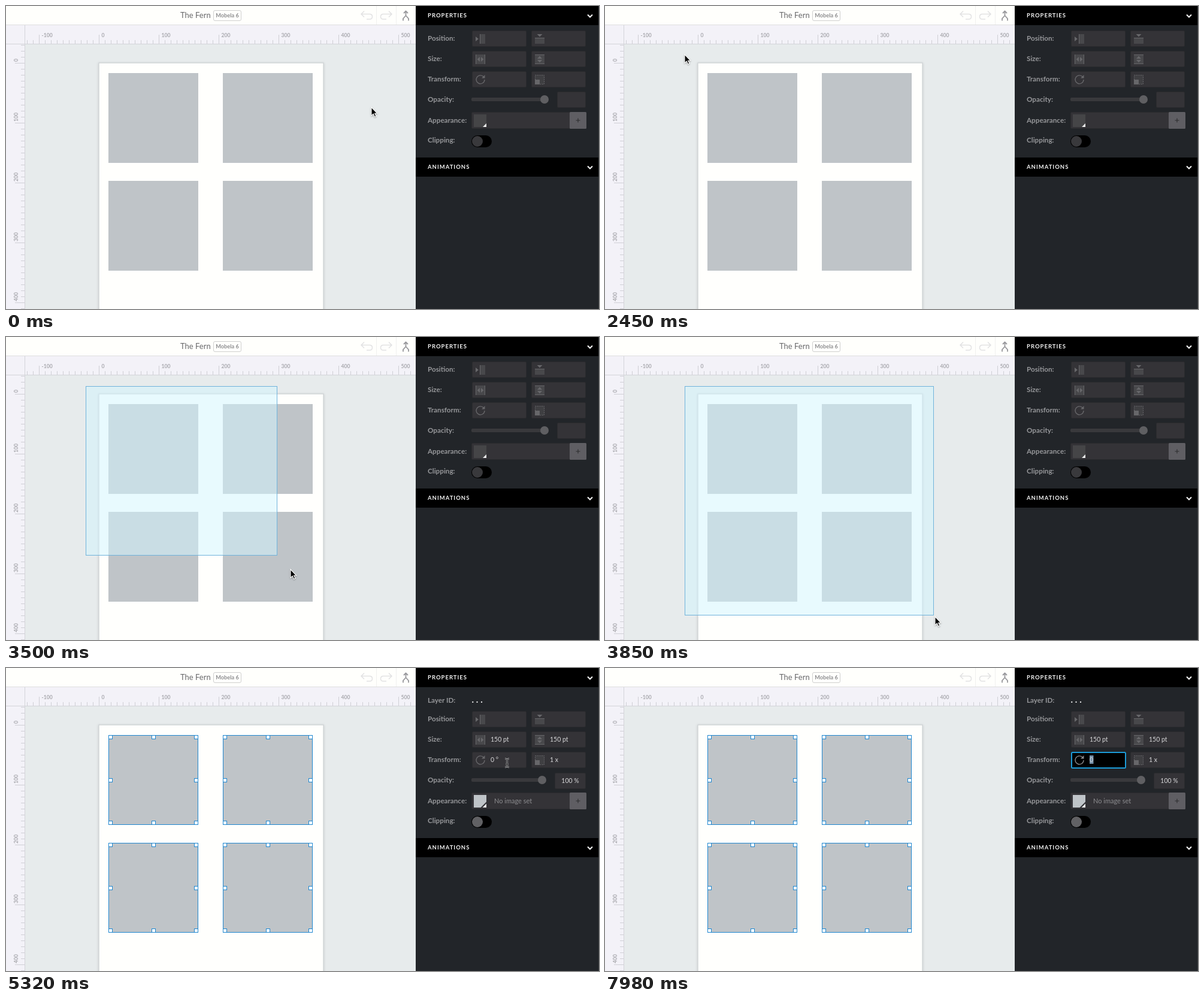
Animation of 990 by 506 pixels, one loop 8 s. Source, as an HTML page:

```html
<!DOCTYPE html>
<html lang="en">
<head>
<meta charset="utf-8">
<title>Layer editor</title>
<style>
html, body { margin: 0; width: 100%; height: 100%; overflow: hidden; background: #e7ebec; }
svg { display: block; font-family: Lato, sans-serif; }
.label { font-size: 11.7px; font-weight: 700; fill: #96979a; }
.value { font-size: 10.5px; fill: #d6d6d8; }
.head { font-size: 9.5px; font-weight: 700; letter-spacing: 1px; fill: #f2f2f2; }
.ruler { font-size: 8.6px; font-weight: 700; fill: #a9a9ae; }
.line { fill: none; }
</style>
</head>
<body>
<svg id="stage" width="990" height="506" viewBox="0 0 990 506"></svg>
<script>
const STEP = 70, LOOP = 8000;
const SELECT_AT = 4200, BEAM_AT = 5320, FOCUS_AT = 5950, HIDE_AT = 7980;
const GREY = '#bfc4c8', BLUE = '#1f87d0';

const rect = (x, y, w, h, fill, more = '') =>
  `<rect x="${x}" y="${y}" width="${w}" height="${h}" fill="${fill}" ${more}/>`;
const text = (x, y, cls, str, more = '') => `<text x="${x}" y="${y}" class="${cls}" ${more}>${str}</text>`;
const line = (d, color, width = 1, more = '') =>
  `<path class="line" d="${d}" stroke="${color}" stroke-width="${width}" ${more}/>`;
const shape = (d, fill) => `<path d="${d}" fill="${fill}"/>`;
const group = (id, content, more = '') => `<g id="${id}" ${more}>${content}</g>`;
const tiles = [[171, 112], [362, 112], [171, 292], [362, 292]];

function rulers() {
  let out = rect(0, 32, 684, 32, '#f3f2f8') + rect(0, 64, 32, 442, '#f3f2f8');
  let minor = '', major = '';
  for (let x = 35; x < 684; x += 10) {
    if ((x - 55) % 100) minor += `M${x + .5} 57V63`;
    else {
      major += `M${x + .5} 48V63`;
      out += text(x + 4.5, 52, 'ruler', x - 155);
    }
  }
  for (let y = 65; y < 506; y += 10) {
    if ((y - 95) % 100) minor += `M25 ${y + .5}H31`;
    else {
      major += `M15 ${y + .5}H31`;
      out += text(0, 0, 'ruler', y - 95, `transform="translate(20 ${y - 2}) rotate(-90)"`);
    }
  }
  return out + line(minor + major, '#cfcfd5') + line('M0 63.5H684M31.5 32V506', '#d3d4d9');
}

function toolbar() {
  const undo = 'M598 8.5L593 13.5L598 18.5M593 13.5H607Q611.5 13.5 611.5 17.8T607 22H602';
  return rect(0, 0, 684, 31, '#fffffc') + rect(0, 31, 684, 1, '#dededf') +
    text(291, 20, '', 'The Fern', 'font-size="13" fill="#68686a"') +
    rect(346.5, 7.5, 46, 17, 'none', 'rx="2.5" stroke="#cfcfcf"') +
    text(369.5, 19.3, '', 'Mobela 6', 'font-size="9.2" font-weight="700" fill="#8d8d8f" text-anchor="middle"') +
    line(undo, '#e2e2e3', 1.5) +
    line(undo, '#e2e2e3', 1.5, 'transform="matrix(-1 0 0 1 1237 0)"') +
    line('M618.5 0V31M651.5 0V31', '#f0f0ee') +
    line('M664 12L667.5 8.5L671 12M667.5 9V16M663 24.5V21L667.5 16L672 21V24.5', '#97979b', 1.8);
}

const page = () =>
  rect(155, 95, 375, 420, '#fffffd', 'stroke="#d0d4d6" stroke-width="1.4" style="filter:drop-shadow(0 1px 2px #0002)"') +
  tiles.map(([x, y]) => rect(x, y, 150, 150, GREY)).join('');

function handles() {
  return tiles.map(([x, y]) => {
    let out = rect(x + .5, y + .5, 149, 149, 'none', `stroke="${BLUE}"`);
    for (const dx of [0, 72, 143]) for (const dy of [0, 72, 143])
      if (dx !== 72 || dy !== 72) out += rect(x + dx + .5, y + dy + .5, 6, 6, '#fff', `stroke="${BLUE}"`);
    return out;
  }).join('');
}

const header = (y, title) => rect(684, y, 305, 32, '#000') + text(704, y + 19, 'head', title) +
  line(`M971 ${y + 14.5}l4 4 4-4`, '#f2f2f2', 2);
const field = (x, y, w = 91, h = 27) =>
  rect(x + .5, y + .5, w - 1, h - 1, '#343337', 'rx="1.5" stroke="#2b2b2e"');
const rotateIcon = color =>
  line('M797.5 118.5A7 7 0 1 0 799 123', color, 1.4) + shape('M799.5 115V120.5H794Z', color);

function icons() {
  const dim = '#48484b', lit = '#67676a';
  return shape('M784 51V59L789 55Z', lit) + rect(792, 47, 8, 16, dim) + rect(791, 47, 1, 16, lit) +
    shape('M886.5 47H895.5L891 51.5Z', lit) + rect(883, 54, 16, 9, dim) + rect(883, 53, 16, 1, lit) +
    rect(784, 81, 16, 16, dim) + line('M784.5 81V97M799.5 81V97', lit) +
    shape('M791 85V93L786.5 89ZM793 85V93L797.5 89Z', lit) +
    rect(883, 81, 16, 16, dim) + line('M883 81.5H899M883 96.5H899', lit) +
    shape('M887 88H895L891 83.5ZM887 90H895L891 94.5Z', lit) +
    rotateIcon(lit) +
    rect(883.5, 115.5, 15, 15, '#3f3f42', `stroke="${lit}" stroke-dasharray="2 1.5"`) + rect(883, 123, 8, 8, lit);
}

// The inspector body; with a selection it moves down and shows values.
function inspector(selected) {
  const names = ['Position', 'Size', 'Transform', 'Opacity', 'Appearance', 'Clipping'];
  const baselines = [58, 92, 126, 160, 195, 228];
  const knob = selected ? 895 : 899, end = selected ? 916 : 920;
  let out = names.map((n, i) => text(704, baselines[i], 'label', n + ':')).join('');
  for (const y of [41, 75, 109]) out += field(778, y) + field(877, y);
  out += icons() +
    rect(777, 153, knob - 777, 6, '#39393c', 'rx="2"') +
    `<circle cx="${knob}" cy="156" r="7" fill="#5f5f62"/>` +
    field(end, selected ? 144 : 143, 968 - end, 27) +
    field(777, 177, 192, 28) + rect(941, 177, 28, 28, '#5f5e63', 'rx="1.5"') +
    line('M951.5 191H958.5M955 187.5V194.5', '#2c2c2f', 1.1) +
    rect(781, 181, 21, 21, selected ? GREY : '#454547') +
    (selected ? line('M793 203L803 193', '#343337', 2) : '') +
    shape('M802 196V202H796Z', '#f0f0f0') +
    rect(777, 216, 34, 20, '#000', 'rx="10"') +
    `<circle cx="787" cy="226" r="9" fill="${selected ? '#616164' : '#39393c'}"/>` +
    header(253, 'ANIMATIONS');
  if (!selected) return out;
  out += text(809, 92, 'value', '150 pt') + text(908, 92, 'value', '150 pt') +
    text(809, 126, 'value', '0 °') + text(908, 126, 'value', '1 x') +
    text(942, 161, 'value', '100 %', 'text-anchor="middle"') +
    text(815, 195.3, '', 'No image set', 'font-size="11" fill="#8e8e91"') +
    group('focus', rect(779, 110, 90, 26, '#000', 'rx="1.5" stroke="#1c9bd8" stroke-width="2"') +
      rotateIcon('#8a8a8d') + rect(809, 115, 6.5, 14, '#7590a8') + text(809, 126, 'value', '0'));
  return text(704, 58, 'label', 'Layer ID:') +
    text(777.5, 58, '', '...', 'font-size="15" font-weight="700" fill="#f0f0f0" letter-spacing="3.8"') +
    `<g transform="translate(0 31)">${out}</g>`;
}

const arrow = 'M1 1V15.2L4.3 12.1L6.6 17.2L8.9 16.2L6.7 11.3H10.8Z';
const beam = 'M833 151.5Q836.5 151.5 836.5 154V163Q836.5 165.5 833 165.5M840 151.5Q836.5 151.5 836.5 154M836.5 163Q836.5 165.5 840 165.5M834.5 160.5H838.5';

document.getElementById('stage').innerHTML =
  rect(0, 0, 684, 506, '#e7ebec') + page() + group('handles', handles()) +
  rulers() + toolbar() +
  rect(133.5, 82.5, 0, 0, 'rgba(212,246,255,.52)', 'id="marquee" stroke="#70b3db"') +
  rect(684, 0, 306, 506, '#222529') + rect(989, 0, 1, 506, '#34373a') + header(0, 'PROPERTIES') +
  group('idle', inspector(false)) + group('selected', inspector(true)) +
  group('beam', line(beam, '#b4b4b6', 2.4) + line(beam, '#1c1c1e', 1)) +
  group('arrow', `<path d="${arrow}" fill="#000" stroke="#fff" stroke-width="1.1" style="filter:drop-shadow(0 1px 1px #0005)"/>`);

const el = Object.fromEntries(['handles', 'marquee', 'idle', 'selected', 'focus', 'beam', 'arrow']
  .map(id => [id, document.getElementById(id)]));
const show = (node, on) => { node.style.display = on ? '' : 'none'; };

// Quick start, soft landing.
function ease(t, start, end) {
  const u = Math.min(1, Math.max(0, (t - start) / (end - start))) ** .78;
  return u * u * (3 - 2 * u);
}

const moves = [
  { start: 1610, end: 2450, from: [609, 168], to: [132, 80], bow: 0 },
  { start: 2800, end: 3850, from: [132, 80], to: [550, 466], bow: .17 },
  { start: 4410, end: 5250, from: [550, 466], to: [829, 150], bow: 0 }
];

function pointer(t) {
  const m = moves.findLast(m => t >= m.start) || moves[0];
  const p = ease(t, m.start, m.end), q = p - m.bow * p * (1 - p);
  const mix = (i, k) => Math.round(m.from[i] + (m.to[i] - m.from[i]) * k);
  return [mix(0, p), mix(1, q)];
}

function draw(now) {
  const t = Math.floor(now % LOOP / STEP) * STEP;
  const chosen = t >= SELECT_AT;
  const [x, y] = pointer(t);
  el.arrow.setAttribute('transform', `translate(${x} ${y})`);
  show(el.arrow, t < BEAM_AT);
  show(el.beam, t >= BEAM_AT && t < HIDE_AT);

  // The marquee trails slightly behind the pointer.
  const dragging = t > 2800 && !chosen;
  show(el.marquee, dragging);
  if (dragging) {
    const [cx, cy] = pointer(Math.max(2800, t - 52));
    el.marquee.setAttribute('width', Math.max(0, cx - 133));
    el.marquee.setAttribute('height', Math.max(0, cy - 82));
  }

  show(el.handles, chosen);
  show(el.selected, chosen);
  show(el.idle, !chosen);
  el.focus.style.opacity = t < FOCUS_AT ? 0 : t < FOCUS_AT + STEP ? .6 : 1;
  requestAnimationFrame(() => draw(performance.now()));
}
draw(performance.now());
</script>
</body>
</html>
```
